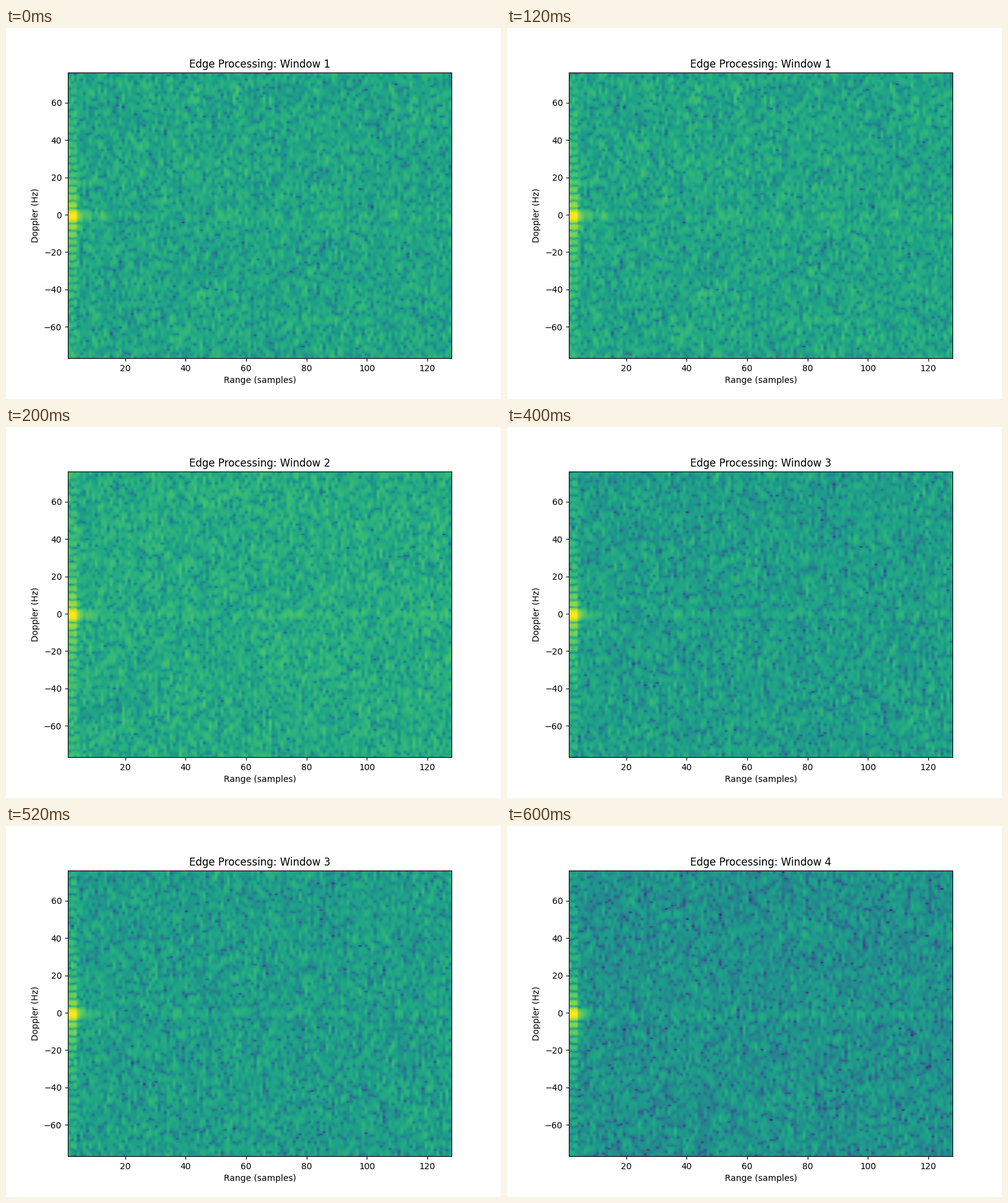
A matplotlib script that plays this animation: 800x600 px, repeating every 0.8 s.

```python
import numpy as np
import matplotlib.pyplot as plt
from matplotlib.animation import FuncAnimation

PULSES, BINS, RANGES = 38, 256, 128
PRF = 153.6
PEAK_DB = 38                             # clutter peak above the mean noise
LOG_MEAN_DB = -2.5                       # mean of unit-power noise in dB
NOISE_LEVELS = [0.58, 0.605, 0.55, 0.50]  # mean noise on the colour scale
EXTENT = [1, RANGES, -PRF / 2, PRF / 2 - PRF / BINS]


def clutter_profile():
    """Amplitude of the stationary return in each range cell."""
    cell = np.arange(RANGES)
    db = -36 + 21 * np.exp(-(cell - 3) / 3.5)
    db[:3] = [-1, 0, 0]
    db[-5:] = -34
    peak = 10 ** ((PEAK_DB + LOG_MEAN_DB) / 20) / np.sqrt(PULSES)
    return peak * 10 ** (db / 20)


def range_doppler(index):
    """Noise plus zero-Doppler clutter as a zero-padded spectrum on a 0..1 scale."""
    rng = np.random.default_rng(40 + index)
    shape = (PULSES, RANGES)
    noise = (rng.normal(size=shape) + 1j * rng.normal(size=shape)) / np.sqrt(2)
    spectrum = np.fft.fft(noise + clutter_profile(), BINS, axis=0)
    power = np.abs(np.fft.fftshift(spectrum, axes=0)) ** 2 / PULSES
    above_noise = 10 * np.log10(power + 1e-9) - LOG_MEAN_DB
    level = NOISE_LEVELS[index]
    return np.clip(level + above_noise * (1 - level) / PEAK_DB, 0, 1)


maps = [range_doppler(i) for i in range(len(NOISE_LEVELS))]

fig, ax = plt.subplots(figsize=(8, 6), dpi=100)
image = ax.imshow(maps[0], extent=EXTENT, aspect="auto", cmap="viridis",
                  vmin=0, vmax=1, interpolation="hanning")
ax.set_xlabel("Range (samples)")
ax.set_ylabel("Doppler (Hz)")
title = ax.set_title("Edge Processing: Window 1")


def update(index):
    image.set_data(maps[index])
    title.set_text(f"Edge Processing: Window {index + 1}")
    return image, title


anim = FuncAnimation(fig, update, frames=len(maps), interval=200,
                     repeat=True, repeat_delay=0)
plt.show()
```
